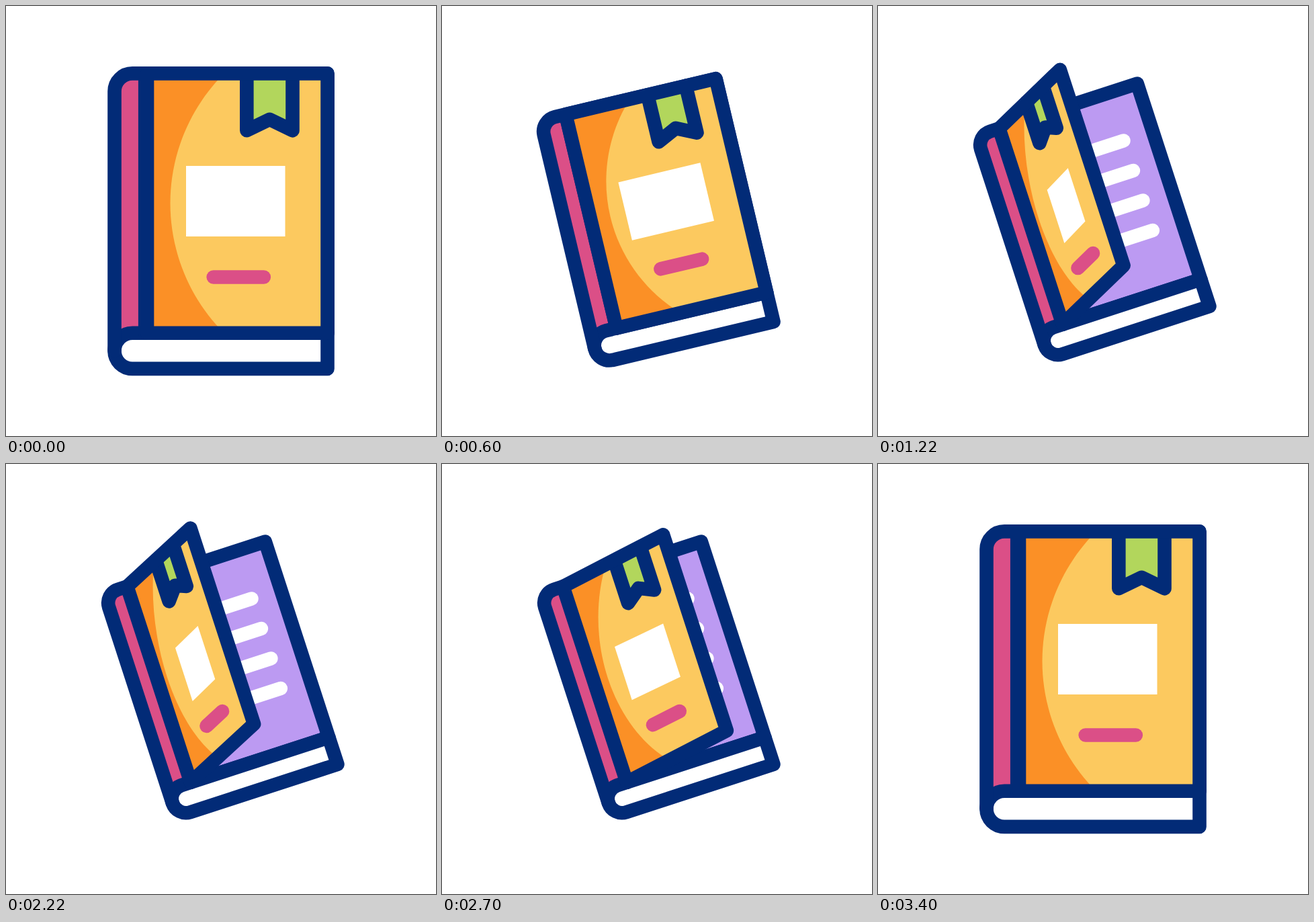
An HTML page that plays this animation: 640x640 px, repeating every 3600 ms.

```html
<!DOCTYPE html>
<html lang="en">
<head>
<meta charset="utf-8">
<title>Book</title>
<style>
html, body { margin: 0; width: 100%; height: 100%; overflow: hidden; background: #fff; }
svg { display: block; width: 100%; height: 100%; }
#book { stroke-linecap: round; stroke-linejoin: round; }
.line { fill: none; stroke: #022b77; }
.white { fill: #fff; }
</style>
</head>
<body>
<svg viewBox="0 0 640 640">
  <g id="book">
    <!-- inside page -->
    <path fill="#bc9af2" stroke="#022b77" d="M-112.8-219.6H158.5V166.8H-112.8Z"/>
    <path fill="none" stroke="#fff" d="M-60-125.6H101M-60-66.6H101M-60-7.6H101M-60 51.4H101"/>
    <!-- spine and page block -->
    <path fill="#db4f87" d="M-112.8-219.6H-132A26.5 26.5 0 0 0-158.5-193.1V193.3H-112.8Z"/>
    <path class="white" stroke="#022b77" d="M158.5 166.8H-132A26.5 26.5 0 0 0-132 219.9H158.5Z"/>
    <path class="line" d="M-112.8 166.8V-219.6H-132A26.5 26.5 0 0 0-158.5-193.1V193.3"/>
    <!-- front cover -->
    <path id="cover" fill="#fb9026"/>
    <path id="light" fill="#fcc95f"/>
    <path id="label" class="white"/>
    <path id="dash" fill="none" stroke="#db4f87"/>
    <path id="mark" fill="#b2d65c" stroke="#022b77"/>
    <path id="edge" class="line"/>
  </g>
</svg>
<script>
const LOOP = 3600, STROKE = 20.6;
const TOP = -219.6, BOTTOM = 166.8, LEFT = -110, RIGHT = 158.5;
const $ = id => document.getElementById(id);
const lerp = (a, b, k) => a + (b - a) * k;

function ease(t, from, to) {
  const x = Math.min(1, Math.max(0, (t - from) / (to - from)));
  return x * x * (3 - 2 * x);
}

const tilt = t => ease(t, 200, 800) - ease(t, 2800, 3400);

const openness = t => ease(t, 800, 1220) - ease(t, 2200, 2400)
  + ease(t, 2400, 2600) - ease(t, 2600, 2800);

const pt = (x, y) => x.toFixed(2) + ' ' + y.toFixed(2);
const poly = pts => 'M' + pts.map(p => pt(...p)).join('L');
const draw = (id, d) => $(id).setAttribute('d', d);

function render(t) {
  const p = tilt(t), o = openness(t), scale = 1 - 0.207 * p;
  const book = $('book');
  book.setAttribute('transform', `translate(320 320) rotate(${-18 * p}) scale(${scale})`);
  book.setAttribute('stroke-width', STROKE / scale);

  // flat upright, flat tilted, open
  const pose = (a, b, c) => lerp(lerp(a, b, p), c, o);

  const left = LEFT - 4 * p, right = RIGHT - 129.7 * o, lift = -69.6 * o;
  const onCover = (x, y) => {
    const u = (x - LEFT) / (RIGHT - LEFT);
    return [lerp(left, right, u), y + u * lift];
  };
  const at = (x, y) => pt(...onCover(x, y));

  const outline = poly([[LEFT, TOP], [RIGHT, TOP], [RIGHT, BOTTOM], [LEFT, BOTTOM]]
    .map(c => onCover(...c))) + 'Z';
  draw('cover', outline);
  draw('edge', outline);
  draw('light', `M${at(4.6, TOP)}C${at(-46.6, -168.6)} ${at(-75.5, -98.7)} ${at(-75.5, -26.4)}`
    + `C${at(-75.5, 45.9)} ${at(-46.6, 115.8)} ${at(4.6, BOTTOM)}`
    + `L${at(RIGHT, BOTTOM)}L${at(RIGHT, TOP)}Z`);

  const l0 = pose(-52, -50, -64), l1 = pose(95.5, 98.5, -14), rise = -27 * o;
  draw('label', poly([[l0, -82], [l1, -82 + rise], [l1, 23 + rise], [l0, 23]]) + 'Z');

  draw('dash', poly([
    [pose(-11.3, -14, -54.3), lerp(83.5, 75.2, o)],
    [pose(63.8, 61, -18.7), lerp(83.5, 57.6, o)]
  ]));

  const m0 = pose(38.3, 34, -50.3), m1 = pose(106.5, 103.5, -11.2);
  const y0 = lerp(-134.7, -169.9, o), y1 = lerp(-134.7, -187, o);
  draw('mark', poly([
    [m0, lerp(TOP, -250.5, o)], [m0, y0],
    [(m0 + m1) / 2, (y0 + y1) / 2 - 16.5],
    [m1, y1], [m1, lerp(TOP, -269.5, o)]
  ]));
}

const start = performance.now();
function frame() {
  render((performance.now() - start) % LOOP);
  requestAnimationFrame(frame);
}
frame();
</script>
</body>
</html>
```
